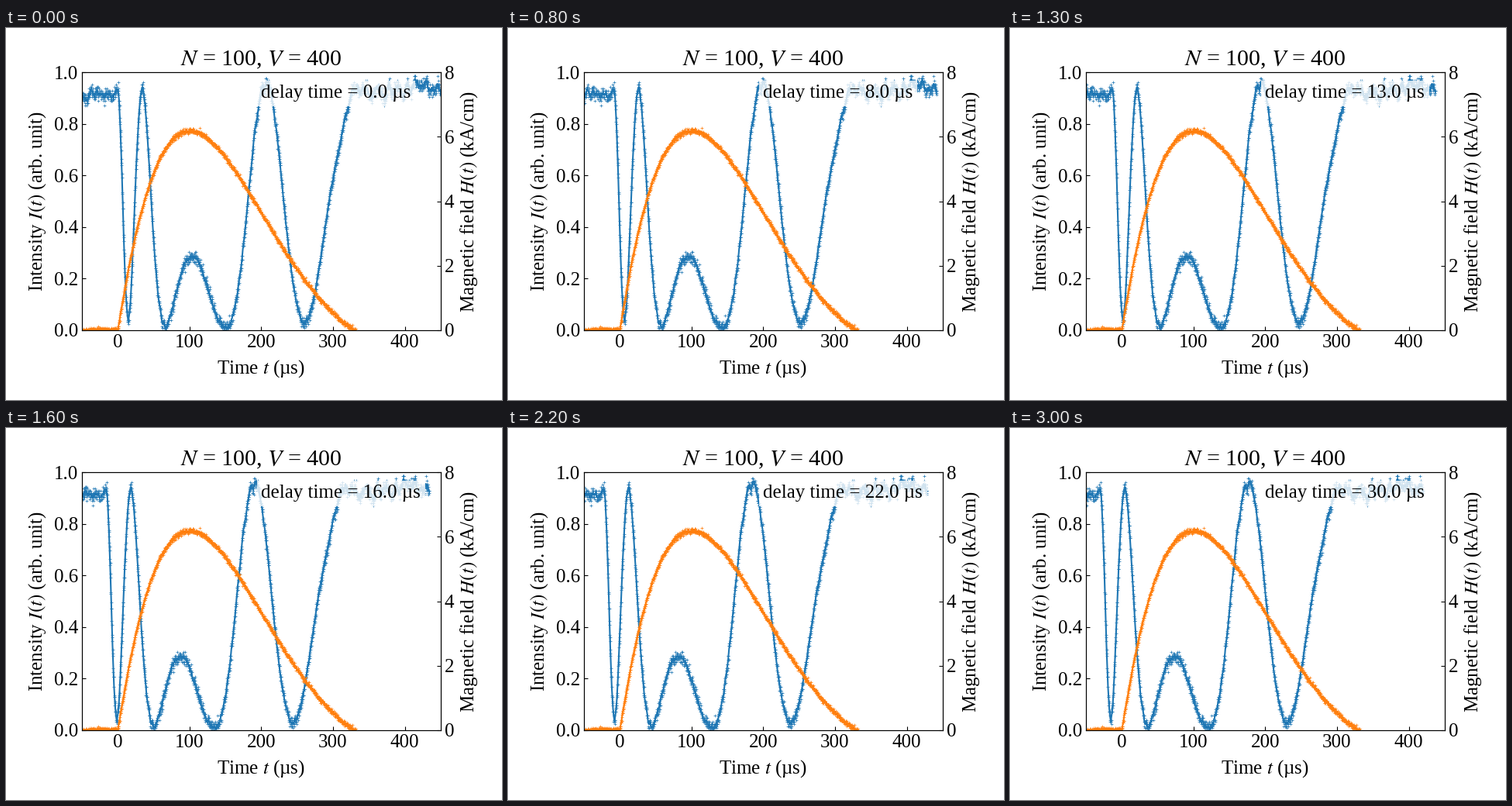
Recreate the animation shown at these times as a matplotlib script. Size 640x480 px, loop 3100 ms.

```python
import numpy as np
import matplotlib.pyplot as plt
from matplotlib.animation import FuncAnimation

plt.rcParams.update({
    "font.family": "Liberation Serif",
    "mathtext.fontset": "stix",
    "font.size": 18,
    "xtick.direction": "in",
    "ytick.direction": "in",
})

W, H, DPI = 640, 480, 100
LEFT, RIGHT, TOP, BOTTOM = 98.0, 560.8, 57.0, 390.0
BLUE, ORANGE = "tab:blue", "tab:orange"
FRAMES, INTERVAL = 31, 100

rng = np.random.default_rng(7)
time = np.arange(-50, 450.01, 0.25)


def hermite(x, knots, values, slopes):
    """Cubic through the knots, constant beyond both ends."""
    x = np.clip(x, knots[0], knots[-1])
    i = np.clip(np.searchsorted(knots, x, side="right") - 1, 0, len(knots) - 2)
    h = knots[i + 1] - knots[i]
    s = (x - knots[i]) / h
    return ((1 + 2 * s) * (1 - s) ** 2 * values[i]
            + s * (1 - s) ** 2 * h * slopes[i]
            + s ** 2 * (3 - 2 * s) * values[i + 1]
            - s ** 2 * (1 - s) * h * slopes[i + 1])


def smooth(y, kernel):
    pad = len(kernel) // 2
    return np.convolve(np.pad(y, pad, mode="edge"), kernel / kernel.sum(), "valid")


def digitize(y, noise, step):
    """Add white noise and round to the recorder's levels."""
    return np.round((y + noise * rng.standard_normal(len(y))) / step) * step


def light_intensity(t):
    # Phase in units of pi; it turns back near the field maximum.
    knots = np.array([0, 14.5, 34, 66, 103, 150, 206.5, 230, 260, 295, 311, 322, 337])
    phase = np.array([0, 0.5, 1, 1.5, 1.682, 1.5, 1, 0.765, 0.5, 0.24, 0.15, 0.08, 0])
    slopes = np.gradient(phase, knots)
    slopes[4] = 0
    c2 = np.cos(np.pi * hermite(t, knots, phase, slopes)) ** 2
    low = np.interp(t, [14, 66, 150, 260], [0.04, 0.015, 0.01, 0.03])
    high = np.interp(t, [0, 34, 150, 208, 260, 340, 450],
                     [0.92, 0.93, 0.95, 0.968, 0.93, 0.93, 0.94])
    bell = np.exp(-0.5 * (np.arange(-40, 41) / 7) ** 2)
    drift = smooth(rng.standard_normal(len(t)), bell)
    drift *= np.where(t > 320, 0.015, 0.011) / drift.std()
    return low + (high - low) * c2 + drift * c2 ** 2


def magnetic_field(t):
    w = np.pi / 329
    a = w / np.tan(100 * w)
    tp = np.maximum(t, 0)
    return 14.9 * np.exp(-a * tp) * np.sin(w * tp)


window = np.ones(9)
light = digitize(light_intensity(time), 0.012, 0.008)
field = digitize(magnetic_field(time), 0.04, 0.04)

fig = plt.figure(figsize=(W / DPI, H / DPI), dpi=DPI, facecolor="white")
ax = fig.add_axes([LEFT / W, 1 - BOTTOM / H, (RIGHT - LEFT) / W, (BOTTOM - TOP) / H])
ax2 = ax.twinx()
ax.set(xlim=(-50, 450), ylim=(0, 1), xticks=range(0, 401, 100))
ax2.set(ylim=(0, 8), yticks=range(0, 9, 2))
ax.set_title("$N$ = 100, $V$ = 400")


def axis_label(x, y, s, rotation=0):
    fig.text(x / W, 1 - y / H, s, rotation=rotation, rotation_mode="anchor",
             ha="center", va="baseline")


mid_x, mid_y = (LEFT + RIGHT) / 2, (TOP + BOTTOM) / 2
axis_label(mid_x, 446, "Time $t$ (µs)")
axis_label(47, mid_y, "Intensity $I(t)$ (arb. unit)", 90)
axis_label(604, mid_y, "Magnetic field $H(t)$ (kA/cm)", 90)


def trace(axes, y, color):
    dots, = axes.plot(time, y, "+", color=color, ms=2.6, mew=0.5)
    line, = axes.plot(time, smooth(y, window), color=color, lw=1.5)
    return dots, line


light_artists = trace(ax, light, BLUE)
trace(ax2, field, ORANGE)
caption = ax.text(200, 0.9, "", va="baseline",
                  bbox=dict(facecolor="white", edgecolor="none", alpha=0.8))


def update(delay):
    for artist in light_artists:
        artist.set_xdata(time - delay)
    caption.set_text(f"delay time = {delay:.1f} µs")
    return (*light_artists, caption)


anim = FuncAnimation(fig, update, frames=FRAMES, interval=INTERVAL, repeat=True)
plt.show()
```
